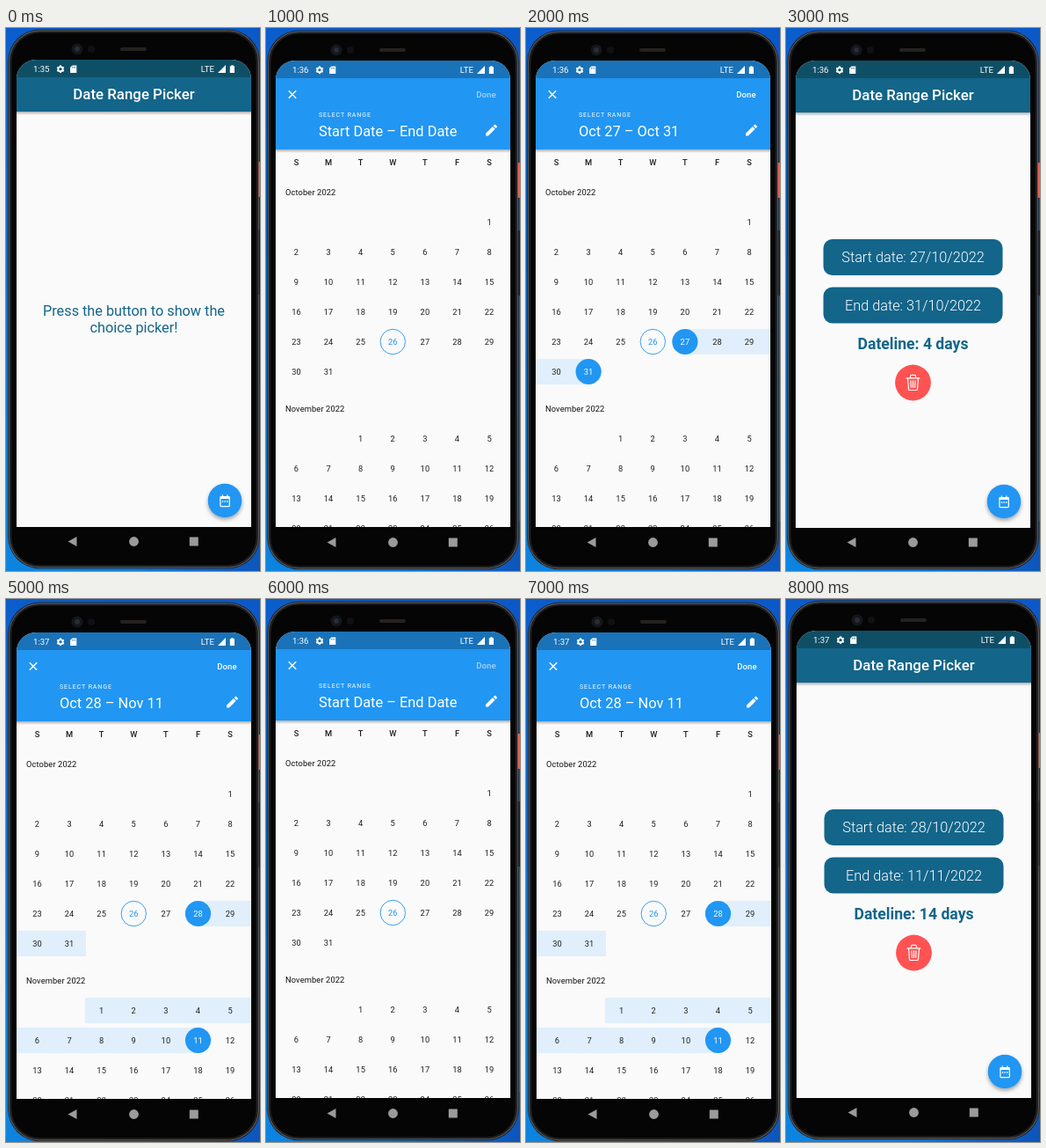
These frames come from a looping animation (289 by 617 pixels, 9 s). An HTML page:

```html
<!DOCTYPE html>
<html lang="en">
<head>
<meta charset="utf-8">
<title>Date Range Picker</title>
<style>
html, body { margin: 0; width: 100%; height: 100%; overflow: hidden; background: #0c62cf; }
svg { display: block; width: 289px; height: 617px; }
text { font-family: Roboto, "Noto Sans", sans-serif; }
</style>
</head>
<body>
<svg id="stage" viewBox="0 0 289 617" xmlns="http://www.w3.org/2000/svg"></svg>
<script>
const TEAL = '#13658a', BLUE = '#2196f3', BAND = '#e0effb', PAPER = '#fafafa', INK = '#1f1f1f';
const STEP = 1000;

// Small markup helpers
const rect = (x, y, w, h, fill, more = '') =>
  `<rect x="${x}" y="${y}" width="${w}" height="${h}" fill="${fill}" ${more}/>`;
const circle = (x, y, r, fill, more = '') =>
  `<circle cx="${x}" cy="${y}" r="${r}" fill="${fill}" ${more}/>`;
const path = (d, more) => `<path d="${d}" ${more}/>`;
const text = (str, x, y, size, fill, { weight = 400, anchor = 'middle', gap = 0 } = {}) =>
  `<text x="${x}" y="${y}" font-size="${size}" fill="${fill}" font-weight="${weight}" ` +
  `text-anchor="${anchor}" letter-spacing="${gap}">${str}</text>`;

const defs = `<defs>
  <linearGradient id="desk" x1=".4" y1="0" x2="0" y2="1">
    <stop offset="0" stop-color="#0b58c8"/><stop offset=".5" stop-color="#0c6bd6"/>
    <stop offset="1" stop-color="#0d84e0"/>
  </linearGradient>
  <linearGradient id="corner">
    <stop offset="0" stop-color="#0d55bb" stop-opacity="0"/><stop offset="1" stop-color="#0d55bb"/>
  </linearGradient>
  <linearGradient id="shade" x2="0" y2="1">
    <stop offset="0" stop-color="#000" stop-opacity=".3"/><stop offset="1" stop-color="#000" stop-opacity="0"/>
  </linearGradient>
  <filter id="drop" x="-40%" y="-40%" width="180%" height="190%">
    <feDropShadow dx="0" dy="2.5" stdDeviation="2" flood-opacity=".35"/>
  </filter>
  <clipPath id="glass"><path d="M12 567V58a22 22 0 0 1 22-22H257a22 22 0 0 1 22 22V567z"/></clipPath>
</defs>`;

function phone() {
  return rect(2.3, 1.8, 286.4, 612.4, '#1a1a1b', 'rx="36"') +
    rect(3.6, 3.1, 283.8, 609.8, 'none', 'rx="35" stroke="#55585b" stroke-width="1.2"') +
    rect(5.8, 5, 279.4, 606, '#050505', 'rx="33" stroke="#262627" stroke-width="1"') +
    rect(287.5, 152, 3, 40, '#ef5a4c') +
    rect(287.5, 229, 3, 74, '#20242a') +
    circle(81, 24, 6.5, '#14161a') + circle(81, 24, 3, '#262c38') +
    circle(97, 24, 4, '#101114') +
    rect(130, 22, 30, 4, '#25221f', 'rx="2"') +
    path('M80.5 578v11l-10-5.5z', 'fill="#9b9b9b"') +
    circle(145.5, 583.5, 5.4, '#9b9b9b') +
    rect(208.8, 578.5, 10, 10, '#9b9b9b');
}

function statusBar(clock, fill) {
  let gear = circle(62, 46.7, 2.6, 'none', 'stroke="#fff" stroke-width="1.9"');
  for (let a = 0; a < 360; a += 60)
    gear += rect(61.1, 42.3, 1.8, 2, '#fff', `transform="rotate(${a} 62 46.7)"`);
  return rect(12, 36, 267, 20.5, fill) +
    text(clock, 31, 50, 9.6, '#fff', { anchor: 'start' }) + gear +
    path('M75.5 42.4h4.8v8.6h-7.2v-6.2z', 'fill="#fff"') +
    path('M75.6 43.9v1.6M77.2 43.9v1.6M78.8 43.9v1.6', `stroke="${fill}" stroke-width=".7"`) +
    text('LTE', 221.8, 50, 9.6, '#fff', { anchor: 'start' }) +
    path('M250 42v9h-9z', 'fill="#fff"') +
    path('M254.800 43.200h1.500v-1h2.200v1h1.500v7.900h-5.200z', 'fill="#fff"');
}

const screen = (body, bottom) =>
  `<g clip-path="url(#glass)">${rect(12, 36, 267, 531, PAPER)}${body}` +
  rect(12, bottom, 267, 4, '#050505') + '</g>';

function fab() {
  return circle(249, 537, 19.3, BLUE, 'filter="url(#drop)"') +
    rect(243.9, 532.6, 10.4, 11, 'none', 'rx=".8" stroke="#fff" stroke-width="1.2"') +
    rect(243.9, 532.4, 10.4, 2.6, '#fff') +
    path('M246.4 530.6v2M251.8 530.6v2', 'stroke="#fff" stroke-width="1.3"') +
    path('M245.8 538h1.4M248.4 538h1.4M251 538h1.4', 'stroke="#fff" stroke-width="1.3"');
}

function appPage(clock, body) {
  return screen(statusBar(clock, '#0f4f66') +
    rect(12, 56, 267, 39, TEAL) + rect(12, 95, 267, 4, 'url(#shade)') +
    text('Date Range Picker', 145.5, 81.2, 16.85, '#fff', { weight: 500 }) + body + fab(), 567);
}

function home(clock) {
  return appPage(clock,
    text('Press the button to show the', 145.5, 327, 16.25, TEAL) +
    text('choice picker!', 145.5, 346, 16.25, TEAL));
}

function trash() {
  return circle(145.5, 402, 20.4, '#ff5252') +
    `<g fill="none" stroke="#fff" stroke-width="1.2" stroke-linejoin="round" stroke-linecap="round">` +
    path('M138 396.8h15M142.5 396.6v-2.2q0-1 1-1h4q1 0 1 1v2.2', '') +
    path('M139.5 397l1 12.2q.1 1.3 1.4 1.3h7.2q1.3 0 1.4-1.3l1-12.2', '') +
    path('M143 399.8l.3 7.6M145.5 399.8v7.6M148 399.8l-.3 7.6', '') + '</g>';
}

function result(clock, start, end, days) {
  const pill = (label, y) => rect(43.5, y, 204, 41, TEAL, 'rx="10"') +
    text(label, 145.5, y + 26, 16.25, '#fff', { weight: 300 });
  return appPage(clock, pill('Start date: ' + start, 239) + pill('End date: ' + end, 293.5) +
    text(`Dateline: ${days} days`, 145.5, 364.2, 17.6, TEAL, { weight: 700 }) + trash());
}

const colX = c => 35.5 + 36.6 * c;
const TODAY = 26;

// Days are counted from 1 October, so 32 is 1 November.
function month(name, labelY, firstCol, offset, count, from, to) {
  let bands = '', days = '';
  const top = labelY + 33.5;
  for (let d = 1; d <= count; d++) {
    const cell = firstCol + d - 1, c = cell % 7, row = Math.floor(cell / 7);
    const x = colX(c), y = top + 34 * row, n = d + offset;
    const isEnd = n === from || n === to;
    if (n >= from && n <= to) {
      const left = n === from ? x : c ? x - 18.4 : 12;
      const right = n === to ? x : c < 6 ? x + 18.4 : 279;
      bands += rect(left, y - 14.5, right - left, 29, BAND, 'shape-rendering="crispEdges"');
    }
    if (isEnd) days += circle(x, y, 14.6, BLUE);
    else if (n === TODAY) days += circle(x, y, 14.2, 'none', `stroke="${BLUE}" stroke-width=".9"`);
    days += text(d, x, y + 3.3, 9.3, isEnd ? '#fff' : n === TODAY ? BLUE : INK, { gap: .15 });
  }
  return bands + days + text(name, 23, labelY + 3.4, 9.3, '#111', { anchor: 'start', gap: .12 });
}

function calendar(clock, title, from, to) {
  const week = [...'SMTWTFS'].map((d, c) => text(d, colX(c), 155, 9.3, INK, { weight: 500 })).join('');
  return screen(
    month('October 2022', 186, 6, 0, 31, from, to) +
    month('November 2022', 432, 2, 31, 30, from, to) + week +
    statusBar(clock, '#1a72b8') +
    rect(12, 56, 267, 81, BLUE) + rect(12, 137, 267, 4, 'url(#shade)') +
    path('M26.8 70.3l8.4 8.4M35.2 70.3l-8.4 8.4', 'stroke="#fff" stroke-width="1.5"') +
    text('Done', 262.8, 78, 9.6, from ? '#fff' : '#a6d5fa', { weight: 500, anchor: 'end', gap: .1 }) +
    text('SELECT RANGE', 61, 99.8, 7, '#fff', { anchor: 'start', gap: .93 }) +
    text(title, 61, 122.1, 16.4, '#fff', { anchor: 'start' }) +
    path('M251 121.6v-2.8l7.8-7.8 2.8 2.8-7.8 7.8zM259.6 110.2l1.3-1.3q.6-.6 1.2 0l1.6 1.6q.6.6 0 1.2l-1.3 1.3z', 'fill="#fff"'), 566);
}

// Each step: shift of the phone on the stage, then its screen
const blank = [-1, 1, calendar('1:36', 'Start Date – End Date')];
const second = [0, 2, calendar('1:37', 'Oct 28 – Nov 11', 28, 42)];
const steps = [
  [0, 0, home('1:35')],
  blank,
  [-1, 1, calendar('1:36', 'Oct 27 – Oct 31', 27, 31)],
  [-1, 1, result('1:36', '27/10/2022', '31/10/2022', 4)],
  [0, 0, home('1:37')],
  second,
  blank,
  second,
  [0, 0, result('1:37', '28/10/2022', '11/11/2022', 14)]
];

const stage = document.getElementById('stage');
stage.innerHTML = defs + rect(0, 0, 289, 617, 'url(#desk)') + rect(150, 560, 139, 57, 'url(#corner)') +
  steps.map(([x, y, page]) =>
    `<g class="step" transform="translate(${x} ${y})" display="none">${phone()}${page}</g>`).join('');
const layers = [...stage.querySelectorAll('.step')];

let shown = -1;
function draw() {
  const now = Math.floor(performance.now() / STEP) % steps.length;
  if (now !== shown) {
    layers.forEach((g, i) => g.setAttribute('display', i === now ? 'inline' : 'none'));
    shown = now;
  }
  requestAnimationFrame(draw);
}
draw();
</script>
</body>
</html>
```
